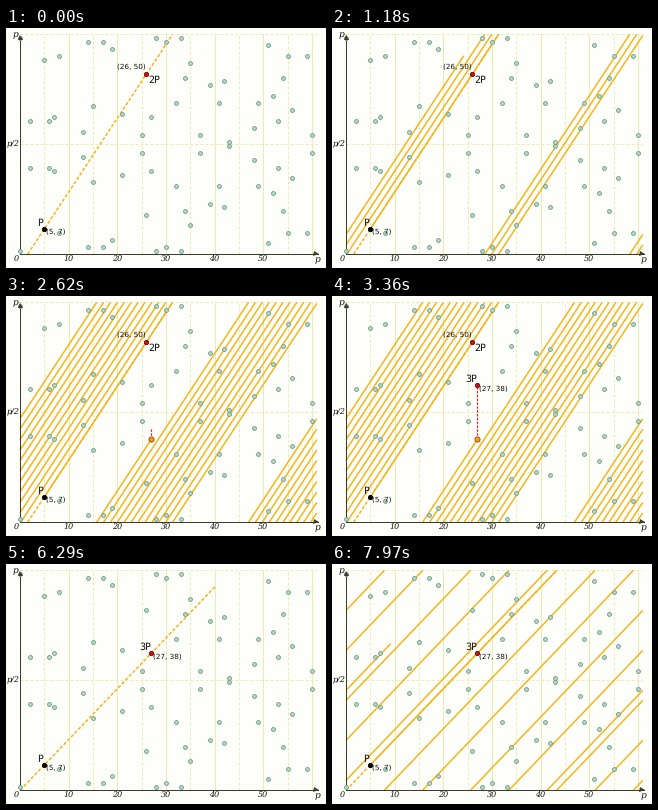
Recreate the animation shown at these times as a matplotlib script. Size 320x240 px, loop 8000 ms.

```python
import math

import matplotlib.pyplot as plt
import numpy as np
from matplotlib.animation import FuncAnimation
from matplotlib.collections import LineCollection

# Chord addition on y^2 = x^3 + 9x + 1 over F_61
MOD = 61
P, P2, P3 = (5, 7), (26, 50), (27, 38)
STEP = 20
LOOP = 8000
PT = 0.9  # points per pixel at 80 dpi

ORANGE = "#f3b51c"
GRID = "#ececb0"
AXIS = "#3c3c28"

plt.rcParams["text.hinting"] = "none"


def pix(x, y):
    return 14 + 4.865 * x, 226.2 - 3.605 * y


def ramp(t, start, end):
    return min(max((t - start) / (end - start), 0), 1)


def ease_out(u):
    return math.sin(u * math.pi / 2)


def speed_up(u, lin):
    return lin * u + (1 - lin) * u ** 4


fig = plt.figure(figsize=(4, 3), dpi=80, facecolor="#fefefa")
ax = fig.add_axes([0, 0, 1, 1])
ax.set_xlim(0, 320)
ax.set_ylim(240, 0)
ax.axis("off")


def line(a, b, color, width, z, **kw):
    return ax.plot([a[0], b[0]], [a[1], b[1]], color=color, lw=width * PT,
                   zorder=z, **kw)[0]


def label(x, y, text, size, font="DejaVu Sans", **kw):
    return ax.text(x, y, text, fontsize=size * PT, family=font, ha="center",
                   va="center", color="#101010", zorder=8, **kw)


def axis_label(x, y, text, size=8):
    return label(x, y, text, size, "DejaVu Serif", style="italic")


def dot(pos, color, edge, size, z=6):
    x, y = pix(*pos)
    return ax.plot([x], [y], "o", ms=size * PT, mfc=color, mec=edge,
                   mew=0.8 * PT, zorder=z)[0]


# Grid and axes
for gx in range(5, MOD, 5):
    style = "-" if gx % 10 == 0 else (0, (3, 2))
    line(pix(gx, 0), pix(gx, MOD), GRID, 1, 1, ls=style)
for gy in (MOD / 2, MOD):
    line(pix(0, gy), pix(MOD, gy), GRID, 1, 1, ls=(0, (3, 2)))
line((14, 226.2), (312, 226.2), AXIS, 1, 4)
line((14, 226.2), (14, 9), AXIS, 1, 4)
for tip, mark in (((310, 226.2), ">"), ((14, 9), "^")):
    ax.plot(*tip, mark, ms=5 * PT, color=AXIS, mew=0, zorder=7)

axis_label(10, 232, "0")
for gx in range(10, 51, 10):
    axis_label(pix(gx, 0)[0], 232, str(gx))
axis_label(311, 232, "p", 9)
axis_label(9.5, 7, "p", 9)
axis_label(6.8, 116, "p/2")

# Curve points
curve = [pix(x, y) for x in range(MOD) for y in range(MOD)
         if (y * y - x ** 3 - 9 * x - 1) % MOD == 0]
ax.plot(*zip(*curve), "o", ms=3.9 * PT, mfc="#b4dcb0", mec="#6a979a",
        mew=0.8 * PT, zorder=5)

dot(P, "black", "black", 4.2)
label(34, 195, "P", 9.5)
label(49.7, 204.5, "(5, 7)", 7.2)


def named(pos, name, name_at, coords, coords_at):
    return [dot(pos, "#d80f18", "#6a0808", 4.2), label(*name_at, name, 9.5),
            label(*coords_at, coords, 7.2)]


mark2 = named(P2, "2P", (148, 52.5), "(26, 50)", (125.8, 39.5))
mark3 = named(P3, "3P", (138.7, 83), "(27, 38)", (161.8, 93))
hit = dot((27, 23), "#fb9c14", "#9a400c", 5.2)
mirror = line((0, 0), (0, 0), "#e02020", 1.2, 5.5, ls=(0, (2, 1.2)))
chord = line((0, 0), (0, 0), "#f5b21a", 1.5, 2, ls=(0, (2.2, 1.3)))
wrap = LineCollection([], colors=ORANGE, linewidths=1.5 * PT, zorder=3)
ax.add_collection(wrap)


def slope_to(q):
    return (q[1] - P[1]) / (q[0] - P[0])


def wrapped(slope, run):
    """Segments of the line from P, folded into the MOD x MOD square."""
    if run <= 0:
        return []
    last = int((P[0] + run * max(1, slope)) // MOD) + 2
    edges = MOD * np.arange(1, last + 1)
    cuts = np.concatenate([[0, run], edges - P[0], (edges - P[1]) / slope])
    cuts = np.sort(cuts[(cuts >= 0) & (cuts <= run)])
    segs = []
    for a, b in zip(cuts[:-1], cuts[1:]):
        mid = (a + b) / 2
        ox = MOD * math.floor((P[0] + mid) / MOD)
        oy = MOD * math.floor((P[1] + slope * mid) / MOD)
        segs.append([pix(P[0] + t - ox, P[1] + slope * t - oy)
                     for t in (a, b)])
    return segs


def fade(artists, alpha):
    for artist in artists:
        artist.set_alpha(alpha)
        artist.set_visible(alpha > 0)


def draw(i):
    t = i * STEP + STEP / 2
    first = t < 4370
    if first:
        slope, grown = slope_to(P2), 1
        run = 693 * speed_up(ramp(t, 130, 1820), 0.29)
    else:
        slope = slope_to(P3)
        grown = ease_out(ramp(t, 5890, 6420))
        run = 836 * speed_up(ramp(t, 6720, 8470), 0.402)

    low = P[0] - P[1] / slope
    top = low + grown * MOD / slope
    a, b = pix(low, 0), pix(top, grown * MOD)
    chord.set_data([a[0], b[0]], [a[1], b[1]])
    chord.set_visible(grown > 0)
    wrap.set_segments(wrapped(slope, run))

    fade(mark2, 1 if first else 0)
    fade(mark3, ramp(t, 3100, 3360) if first else 1)
    fade([hit], ramp(t, 2290, 2550) if first else 0)

    rise = ease_out(ramp(t, 2560, 3090)) if first else 0
    a, b = pix(27, 23), pix(27, 23 + 15 * rise)
    mirror.set_data([a[0], b[0]], [a[1], b[1]])
    mirror.set_visible(rise > 0)
    return [chord, wrap, hit, mirror, *mark2, *mark3]


anim = FuncAnimation(fig, draw, frames=LOOP // STEP, interval=STEP,
                     repeat=True, repeat_delay=0, blit=False)
plt.show()
```
